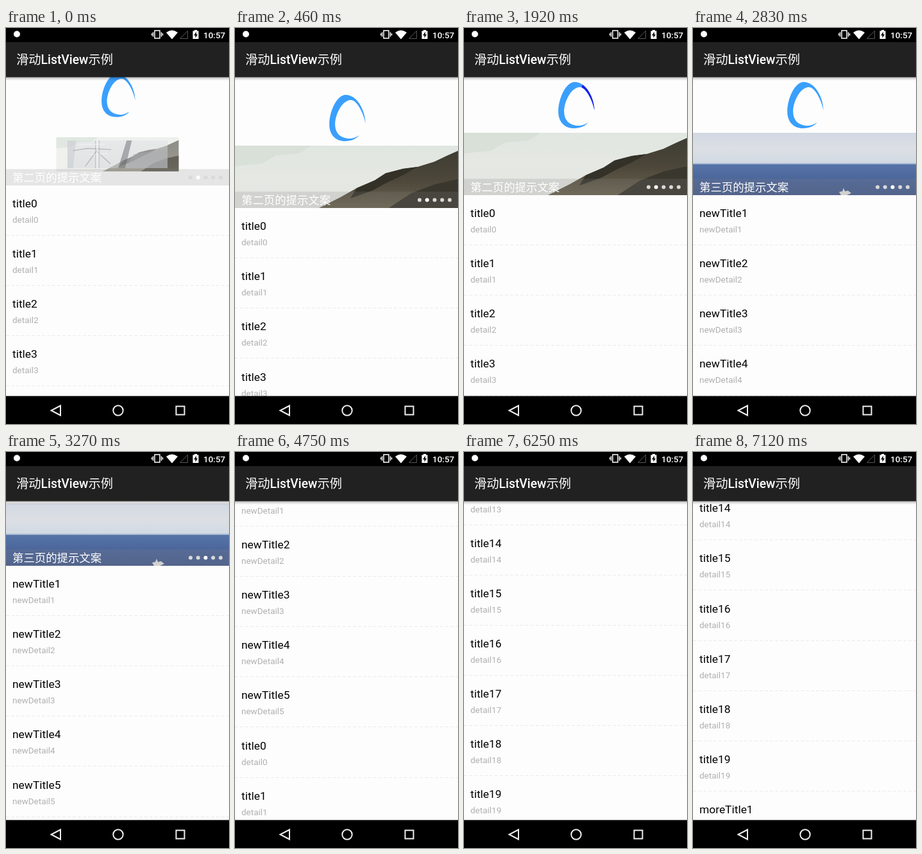
These frames come from a looping animation (348 px wide and 616 px high, 8310 ms). An HTML page with a canvas:

```html
<!DOCTYPE html>
<html lang="zh">
<head>
<meta charset="utf-8">
<style>
html, body { margin: 0; width: 100%; height: 100%; overflow: hidden; background: #000; }
canvas { display: block; }
</style>
</head>
<body>
<canvas id="stage" width="348" height="616"></canvas>
<script>
const c = document.getElementById('stage').getContext('2d');
const LOOP = 8310, W = 348, BANNER = 97, PITCH = 78.15;
const SANS = 'Roboto, "Noto Sans CJK SC", "Noto Sans CJK", sans-serif';
const CJK = '"Noto Sans CJK SC", "Noto Sans CJK", sans-serif';

const part = (t, a, b) => Math.min(1, Math.max(0, (t - a) / (b - a)));
const smooth = (t, a, b) => { const u = part(t, a, b); return u * u * (3 - 2 * u); };
const out = (t, a, b, n) => 1 - (1 - part(t, a, b)) ** n;

function rect(x, y, w, h, fill) {
  c.fillStyle = fill;
  c.fillRect(x, y, w, h);
}
function text(str, x, y, font, fill) {
  c.font = font;
  c.fillStyle = fill;
  c.fillText(str, x, y);
}
function dot(x, y, r, fill) {
  c.beginPath();
  c.arc(x, y, r, 0, 7);
  c.fillStyle = fill;
  c.fill();
}
function shape(d, fill) {
  c.fillStyle = fill;
  c.fill(new Path2D(d));
}
function line(d, color, width) {
  c.strokeStyle = color;
  c.lineWidth = width;
  c.stroke(new Path2D(d));
}
function fade(y0, y1, ...colors) {
  const g = c.createLinearGradient(0, y0, 0, y1);
  colors.forEach((k, i) => g.addColorStop(i / (colors.length - 1), k));
  return g;
}

// Lower edge of the banner: pull, settle, close, drag, fling
const bannerEnd = t => 244.8
  + 65.2 * smooth(t, 60, 820)
  - 50 * out(t, 870, 1400, 2.25)
  - 87 * out(t, 2830, 3420, 2.25)
  - 133.5 * smooth(t, 3570, 3890)
  - 1465.1 * out(t, 4750, 6730, 2.32);

const pages = [
  function bike() {
    rect(0, 0, W, BANNER, fade(0, BANNER, '#dddfe3', '#cfd1d6'));
    shape('M0 0H30L20 97H0Z', '#c2c5ca');
    line('M20 36L70 28 152 32M104 34L62 90M104 40L150 82', '#7d8289', 3);
    line('M104 0V97', '#f4f4f5', 9);
    line('M98 0V97M110 0V97', '#6f747a', 2);
    line('M40 14H130M80 50L140 46', '#f4f4f5', 4);
    shape('M176 97L206 0H224L200 97Z', '#5a5d63');
    shape('M200 97L230 48 348 30V97Z', '#a9abb2');
  },
  function hill() {
    rect(0, 0, W, BANNER, fade(0, BANNER, '#e0e6e0', '#e5e8e3', '#e4e5e1'));
    shape('M0 0H120L100 12 64 15 42 28 0 32Z', '#d8e0d8');
    shape('M131 97L165 80 190 66 218 54 235 43 262 36 285 33 311 25 330 16 348 8V97Z',
      fade(10, BANNER, '#3f3c33', '#4c473a', '#6b6450'));
    shape('M190 66L218 54 235 43 262 36 285 33 262 46 236 58 214 70 180 82Z', '#343128');
    shape('M240 97L275 74 312 60 348 52V97Z', '#3a372e');
  },
  function sea() {
    rect(0, 0, W, 50, fade(0, 50, '#d2d8e3', '#dcdfe4', '#d0d9e4'));
    rect(0, 47, W, 2, '#a9bad2');
    rect(0, 49, W, 48, fade(49, BANNER, '#5674a8', '#4b659a', '#485d8d'));
    shape('M228 92L233 91 235 86 237 91 242 90 247 94 240 97H231Z', '#e6e4e2');
  }
];

function drawPage(i, size) {
  if (size <= 0) return;
  c.save();
  c.globalAlpha = size;
  c.translate(W / 2, BANNER / 2);
  c.scale(size, size);
  c.translate(-W / 2, -BANNER / 2);
  c.beginPath();
  c.rect(0, 0, W, BANNER);
  c.clip();
  pages[i]();
  c.restore();
}

function drawBanner(t, end) {
  const second = t >= 2000;
  const now = second ? 2 : 1;
  const size = second ? smooth(t, 2000, 2560) : 0.55 + 0.45 * out(t, 60, 420, 2);
  c.save();
  c.translate(0, end - BANNER);
  drawPage(now, size);
  drawPage(now - 1, 1 - size);
  rect(0, 71.5, W, 25.5, 'rgba(130,130,130,.2)');
  text(`第${second ? '三' : '二'}页的提示文案`, 10, 90.5, '17.4px ' + CJK, '#fff');
  for (let i = 0; i < 5; i++) dot(288 + 11.75 * i, 84.5, 3, i === now ? '#fff' : '#d9d9d9');
  c.restore();
}

const EGG = 'M28 8C27-14 14-36-3-36C-17-36-28.5-10-28.5 10C-28.5 26-19 36-4 36C6 36 14 32 18 27' +
  'C12 31 6 32.5 1 32C-11 31-19.5 24-19.5 10C-19.5-6-8-28 5-28C14-28 24-10 28 8Z';

function drawEgg(t, end) {
  const size = Math.min(1, 0.6 + 0.4 * (end - 173) / 87);
  c.save();
  c.translate(175.7, end - 140);
  c.scale(size, size);
  shape(EGG, '#3a9ffc');
  if (t > 880 && t < 2660) {
    const head = (137 + (t - 1100) * 0.3) * Math.PI / 180;
    c.beginPath();
    c.moveTo(0, 0);
    c.arc(0, 0, 60, head - 1.7, head);
    c.clip();
    shape(EGG, '#1a1fe8');
  }
  c.restore();
}

function rowName(i, fresh) {
  if (!fresh) return ['', i];
  if (i < 5) return ['new', i + 1];
  return i < 25 ? ['', i - 5] : ['more', i - 24];
}

function drawRows(t, end) {
  const fresh = t >= 2660;
  const first = Math.max(0, Math.floor((70 - end) / PITCH));
  for (let i = first; i < 26; i++) {
    const y = Math.round(end + i * PITCH);
    if (y > 572) break;
    const [kind, n] = rowName(i, fresh);
    c.globalAlpha = kind === 'more' ? smooth(t, 6900, 7120) : 1;
    text(kind + (kind ? 'Title' : 'title') + n, 10, y + 34, '17.4px ' + SANS, '#000');
    text(kind + (kind ? 'Detail' : 'detail') + n, 10, y + 58, '13.5px ' + SANS, '#b0b0b0');
    c.setLineDash([5, 3]);
    line(`M0 ${y + 77.5}H348`, '#ebebeb', 1);
    c.setLineDash([]);
  }
  c.globalAlpha = 1;
}

function drawBars() {
  rect(0, 76, W, 6, fade(76, 82, 'rgba(0,0,0,.32)', 'rgba(0,0,0,.12)', 'rgba(0,0,0,0)'));
  rect(0, 0, W, 22, '#000');
  rect(0, 22, W, 54.5, '#212121');
  rect(0, 572.5, W, 43.5, '#000');

  let x = 16;
  for (const [str, font] of [['滑动', '19.3px ' + CJK], ['ListView', '500 19.3px ' + SANS], ['示例', '19.3px ' + CJK]]) {
    text(str, x, 56, font, '#fff');
    x += c.measureText(str).width;
  }

  dot(17, 9.5, 5, '#fff');
  line('M232 4H240V16H232ZM229.5 6.5V13.5M242.5 6.5V13.5M227.5 8.5V11.5M244.5 8.5V11.5', '#fff', 1.5);
  shape('M250 7Q259 0 268 7L259 17.5Z', '#fff');
  line('M283.5 4.5V16.5H271.5Z', '#555', 1);
  shape('M291.5 4.5H294V3H298V4.5H300.5V17H291.5Z', '#fff');
  shape('M297 6L293 11.5H295.5V15.5L299 10H297Z', '#000');
  text('10:57', 308, 15.5, '500 13.5px ' + SANS, '#fff');

  line('M85 587.5V602.5L70.5 595ZM265.5 588.5H278.5V601.5H265.5Z', '#eee', 2);
  c.beginPath();
  c.arc(175, 595, 7.7, 0, 7);
  c.stroke();
}

function draw(t) {
  const end = Math.round(bannerEnd(t));
  rect(0, 0, W, 616, '#fdfdfd');
  if (end > 173) drawEgg(t, end);
  if (end > 76) drawBanner(t, end);
  drawRows(t, bannerEnd(t));
  drawBars();
}

const start = performance.now();
function tick() {
  draw((performance.now() - start) % LOOP);
  requestAnimationFrame(tick);
}
tick();
</script>
</body>
</html>
```
